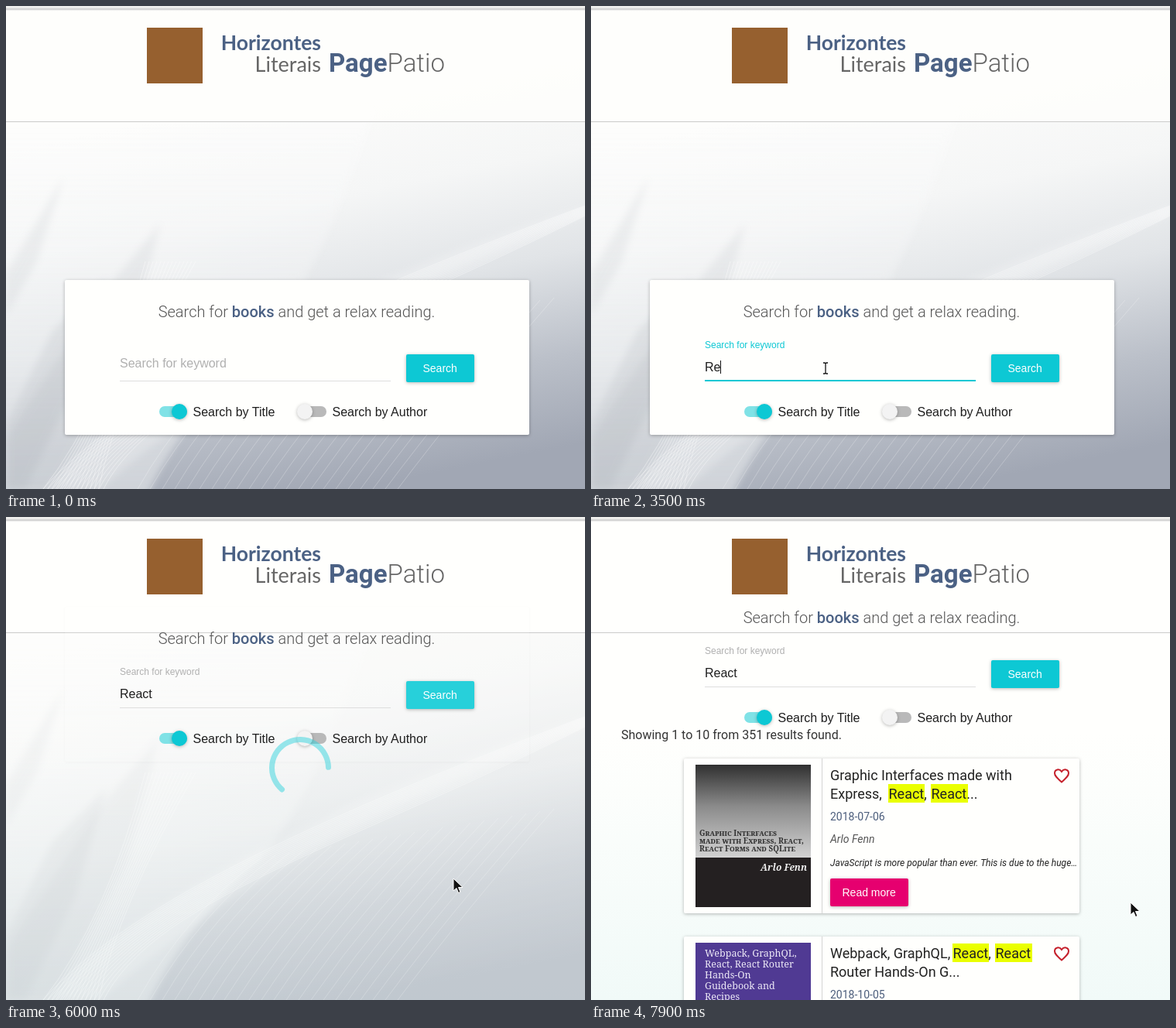
Recreate the animation shown at these times as an HTML page. Size 748 by 624 pixels, loop 8 s.

```html
<!DOCTYPE html>
<html lang="en">
<head>
<meta charset="utf-8">
<title>Book search</title>
<style>
html, body { margin: 0; width: 100%; height: 100%; overflow: hidden; background: #fff; }
svg { display: block; width: 748px; height: 624px; }
text { white-space: pre; font-family: Roboto, sans-serif; }
.ui { font-family: "Liberation Sans", Arial, sans-serif; }
.serif { font-family: "Noto Serif", "Liberation Serif", serif; }
.logo { font-family: Lato, sans-serif; }
.lift { filter: drop-shadow(0 1px 2px rgba(0,0,0,.28)); }
.soft { filter: blur(5px); }
.title { font-size: 18px; fill: #222; }
</style>
</head>
<body>
<svg viewBox="0 0 748 624">
  <defs>
    <linearGradient id="sky" x1=".36" y1="0" x2=".6" y2="1">
      <stop offset=".2" stop-color="#fcfcfb"/><stop offset=".42" stop-color="#f5f6f6"/>
      <stop offset=".62" stop-color="#e1e4e7"/><stop offset=".82" stop-color="#bbc0c9"/>
      <stop offset="1" stop-color="#a1a7b4"/>
    </linearGradient>
    <linearGradient id="mint" x2="0" y2="1">
      <stop offset=".45" stop-color="#fffffd"/><stop offset="1" stop-color="#f1faf8"/>
    </linearGradient>
    <linearGradient id="steel" x2="0" y2="1">
      <stop offset="0" stop-color="#303030"/><stop offset=".45" stop-color="#8b8b8b"/>
      <stop offset="1" stop-color="#d2d2d2"/>
    </linearGradient>
    <linearGradient id="edge" x2="0" y2="1">
      <stop offset="0" stop-color="#f1f1ee"/><stop offset=".45" stop-color="#eaeae8"/>
      <stop offset=".55" stop-color="#bdbdbd"/><stop offset="1" stop-color="#fff" stop-opacity="0"/>
    </linearGradient>
    <linearGradient id="pale" x2="0" y2="1">
      <stop offset="0" stop-color="#fff" stop-opacity=".3"/><stop offset="1" stop-color="#e6e9eb" stop-opacity=".6"/>
    </linearGradient>
  </defs>

  <rect width="748" height="624" fill="url(#mint)"/>
  <g id="art">
    <rect width="748" height="624" fill="url(#sky)"/>
    <path class="soft" d="M-20 130H480Q400 360 330 440Q220 540 178 644H-20Z" fill="url(#pale)"/>
    <path class="soft" d="M0 345L75 220L40 330L0 400ZM0 560L110 390L200 280L155 450L60 624H0Z" fill="#9aa0a8" opacity=".12"/>
    <path class="soft" d="M0 540L60 420L130 350L90 490L25 624H0Z" fill="#9aa0a8" opacity=".16"/>
    <path class="soft" d="M50 624C170 500 400 370 748 258V270C500 370 320 450 122 624Z" fill="#fff" opacity=".22"/>
    <g id="mesh" fill="none" stroke="#fff"></g>
  </g>

  <rect id="header" width="748" height="149" fill="#fffffd"/>
  <path d="M0 149.5H748" stroke="#cbcbcb"/>
  <rect width="748" height="7" fill="url(#edge)"/>
  <rect x="182" y="28" width="72" height="72" fill="#96602f"/>
  <g text-anchor="end">
    <text class="logo" x="407" y="57" font-size="26.5" font-weight="700" fill="#4b6184">Horizontes</text>
    <text class="logo" x="407" y="85" font-size="27" fill="#666">Literais</text>
  </g>
  <text x="417" y="85" font-size="33" font-weight="300" fill="#666"><tspan font-weight="700" fill="#4b6184">Page</tspan>Patio</text>

  <g id="results">
    <text x="39" y="287" font-size="16" fill="#333">Showing 1 to 10 from 351 results found.</text>
    <g id="cards"></g>
    <rect x="135" y="320" width="149" height="120" fill="url(#steel)"/>
    <rect x="135" y="440" width="149" height="64" fill="#242021"/>
    <g font-size="9.8" font-weight="600" fill="#333" style="font-variant:small-caps">
      <text class="serif" x="140" y="412">Graphic Interfaces</text>
      <text class="serif" x="140" y="422">made with Express, React,</text>
      <text class="serif" x="140" y="432">React Forms and SQLite</text>
    </g>
    <text class="serif" x="279" y="457" font-size="12" font-weight="600" font-style="italic" fill="#eee" text-anchor="end">Arlo Fenn</text>
    <path d="M384 345h47v24h-47zM439 345h48v24h-48zM467 551h47v24h-47zM522 551h48v24h-48z" fill="#eaff00"/>
    <text class="title" x="309" y="340">Graphic Interfaces made with</text>
    <text class="title" x="309" y="364">Express, <tspan x="384.5">React</tspan>, <tspan x="439.5">React</tspan>...</text>
    <text x="309" y="392" font-size="14" fill="#4b5d7c">2018-07-06</text>
    <text x="309" y="421" font-size="14" font-style="italic" fill="#555">Arlo Fenn</text>
    <text x="309" y="451" font-size="12" font-style="italic" fill="#222">JavaScript is more popular than ever. This is due to the huge…</text>
    <rect class="lift" x="309" y="467" width="101" height="36" rx="2" fill="#e6006f"/>
    <text class="ui" x="324.5" y="490" font-size="14" fill="#fff">Read more</text>
    <rect x="135" y="550" width="149" height="74" fill="#503a93"/>
    <g id="cover" fill="#ece8f6" font-size="12.5"></g>
    <text class="title" x="309" y="570">Webpack, GraphQL, <tspan x="467.5">React</tspan>, <tspan x="522.5">React</tspan></text>
    <text class="title" x="309" y="594">Router Hands-On G...</text>
    <text x="309" y="622" font-size="14" fill="#4b5d7c">2018-10-05</text>
  </g>

  <g id="form">
    <rect id="panel" class="lift" x="76" y="354" width="600" height="200" rx="2" fill="#fffffd"/>
    <text x="375.5" y="402" font-size="20" font-weight="300" fill="#555" text-anchor="middle">Search for <tspan font-weight="500" fill="#4b6184">books</tspan> and get a relax reading.</text>
    <text id="label" class="ui" x="147">Search for keyword</text>
    <text id="hint" class="ui" x="147" y="474" font-size="16" fill="#d8d8d8">Type a keyword</text>
    <text id="typed" class="ui" x="147" y="472" font-size="16" fill="#1e1e1e"></text>
    <path id="caret" stroke="#111"/>
    <path d="M147 484.5H497" stroke="#dedede"/>
    <path id="line" stroke="#0dc8d4" stroke-width="2"/>
    <rect id="button" class="lift" x="517" y="450" width="88" height="36" rx="2"/>
    <text class="ui" x="538.5" y="473" font-size="14" fill="#fff">Search</text>
    <rect x="198" y="517" width="36" height="14" rx="7" fill="#80e2e6"/>
    <circle class="lift" cx="224" cy="524" r="10" fill="#0dc8d4"/>
    <rect x="378" y="517" width="36" height="14" rx="7" fill="#b9b9b9"/>
    <circle class="lift" cx="386" cy="524" r="10" fill="#f3f3f3"/>
    <text class="ui" x="241.5" y="530" font-size="16" fill="#1e1e1e">Search by Title</text>
    <text class="ui" x="421.5" y="530" font-size="16" fill="#1e1e1e">Search by Author</text>
  </g>

  <path id="spinner" fill="none" stroke="#2fd3dc" stroke-width="7" stroke-linecap="round"/>
  <g id="pointer">
    <path id="arrow" d="M0 0V16L4 12.5L6.5 18.5L9 17.5L6.5 11.5H12Z" fill="#111" stroke="#fff"/>
    <path id="beam" d="M-3-7H-1L0-6L1-7H3M0-6V6M-3 7H-1L0 6L1 7H3" fill="none" stroke="#111" stroke-width="1.3"/>
    <path id="hand" d="M2 0Q4 0 4 2V6L11 7.5Q13 8 13 10L12 15H4L0 10Q-1 8 2 9L1 2Q0 0 2 0Z" fill="#111" stroke="#fff"/>
  </g>
</svg>
<script>
const $ = id => document.getElementById(id);
const set = (id, attrs) => {
  for (const k in attrs) $(id).setAttribute(k, attrs[k]);
};
const clamp = v => Math.max(0, Math.min(1, v));
const ramp = (t, from, to) => clamp((t - from) / (to - from));
const mix = (a, b, p) => a + (b - a) * p;
const blend = (a, b, p) => `rgb(${a.map((v, i) => Math.round(mix(v, b[i], p)))})`;
const within = (t, a, b) => t >= a && t < b;
const easeOut = p => 1 - (1 - p) ** 5;

// cubic-bezier(.4, 0, .2, 1), solved by bisection
function standard(x) {
  let lo = 0, hi = 1, s;
  for (let i = 0; i < 24; i++) {
    s = (lo + hi) / 2;
    const bx = 1.2 * (1 - s) ** 2 * s + .6 * (1 - s) * s * s + s ** 3;
    if (bx < x) lo = s; else hi = s;
  }
  return 3 * (1 - s) * s * s + s ** 3;
}

// Light threads of the backdrop
const thread = (d, o) => `<path d="${d}" opacity="${o}"/>`;
let threads = '';
for (let i = 0; i < 14; i++) {
  threads += thread(`M${48 + 5.5 * i} 624Q${130 + i} ${520 - i} ${180 + 5 * i} 330`, .4);
  threads += thread(`M${48 + 6 * i} 624C${140 + 4 * i} ${520 - 2 * i} ${330 + 8 * i} ${415 + i} 748 ${258 + i}`, .4);
}
for (let i = 0; i < 22; i++)
  threads += thread(`M${170 + 16 * i} 624Q${235 + 17 * i} 510 ${330 + 18 * i} ${440 - 3 * i}`, .25);
$('mesh').innerHTML = threads;

$('cards').innerHTML = [312, 542].map(y => `
  <rect class="lift" x="120" y="${y}" width="511" height="200" rx="2" fill="#fffffd"/>
  <path d="M298.5 ${y}v200" stroke="#d4d4d4"/>
  <path transform="translate(598 ${y + 13})" fill="none" stroke="#c5202b" stroke-width="2"
    d="M10 17.5C4 12 1 9.5 1 6C1 1 7-.5 10 4C13-.5 19 1 19 6C19 9.5 16 12 10 17.5Z"/>`).join('');
$('cover').innerHTML = ['Webpack, GraphQL,', 'React, React Router', 'Hands-On', 'Guidebook and', 'Recipes']
  .map((s, i) => `<text class="serif" x="147" y="${568 + 14 * i}">${s}</text>`).join('');

const keyTimes = [3100, 3500, 3600, 3800, 3900];
const route = [
  [500, 428, 1], [600, 606, 66], [700, 606, 66], [1000, 261, 346], [1200, 261, 346],
  [1600, 303, 468], [4800, 303, 468], [5100, 520, 467], [5400, 520, 467],
  [5800, 578, 467], [7300, 578, 467], [7700, 697, 498]
];

function drawPointer(t) {
  const n = route.findIndex(k => k[0] > t);
  const b = route[n < 0 ? route.length - 1 : n];
  const a = n > 0 ? route[n - 1] : b;
  const p = ramp(t, a[0], b[0] + .01);
  set('pointer', {
    transform: `translate(${Math.round(mix(a[1], b[1], p))} ${Math.round(mix(a[2], b[2], p))})`,
    opacity: +(t >= 500)
  });
  const shape = within(t, 1600, 5100) ? 'beam' : within(t, 5100, 5700) ? 'hand' : 'arrow';
  for (const id of ['arrow', 'beam', 'hand']) set(id, { opacity: +(id === shape) });
}

function drawField(t) {
  const open = easeOut(ramp(t, 1850, 2300));
  const focus = open - easeOut(ramp(t, 5500, 5950));
  set('label', {
    y: mix(467, 442, open), 'font-size': mix(16, 12, open),
    fill: blend([176, 176, 176], [13, 200, 212], focus)
  });
  const half = 175 * focus;
  set('line', { d: `M${322 - half} 484H${322 + half}`, opacity: +(half > .3) });

  const count = keyTimes.filter(k => t >= k).length;
  $('typed').textContent = 'React'.slice(0, count);
  set('hint', { opacity: +(t >= 1900 && !count) });
  const x = 147.5 + (count && Math.round($('typed').getComputedTextLength()));
  const lit = within(t, 1900, 2400) || within(t, 3000, 4500) || within(t, 4900, 5500);
  set('caret', { d: `M${x} ${count ? 458 : 460}v17`, opacity: +lit });

  const hover = ramp(t, 4950, 5100) * (1 - ramp(t, 5750, 6250));
  set('button', { fill: blend([13, 200, 212], [64, 215, 223], hover) });
}

function drawSpinner(t) {
  const from = 90 + .2 * (t - 5800), to = from + 221 + .04 * (t - 5800);
  const at = deg => {
    const r = deg * Math.PI / 180;
    return `${380 + 36.5 * Math.cos(r)} ${324 + 36.5 * Math.sin(r)}`;
  };
  set('spinner', {
    d: `M${at(from)}A36.5 36.5 0 1 1 ${at(to)}`,
    opacity: ramp(t, 5760, 6250) * (1 - ramp(t, 6300, 6600))
  });
}

function draw(now) {
  const t = Math.floor(now % 8000 / 100) * 100; // ten pictures a second
  const rise = standard(ramp(t, 5583, 6243));
  set('form', { transform: `translate(0 ${-Math.round(265 * rise)})` });
  set('panel', { opacity: 1 - rise });
  set('header', { opacity: mix(.75, 1, ramp(t, 5450, 5800)) });
  set('art', { opacity: 1 - ramp(t, 5800, 6300) });
  set('results', { opacity: ramp(t, 6300, 7000) });
  drawField(t);
  drawSpinner(t);
  drawPointer(t);
}

const start = performance.now();
(function loop() {
  draw(performance.now() - start);
  requestAnimationFrame(loop);
})();
</script>
</body>
</html>
```
